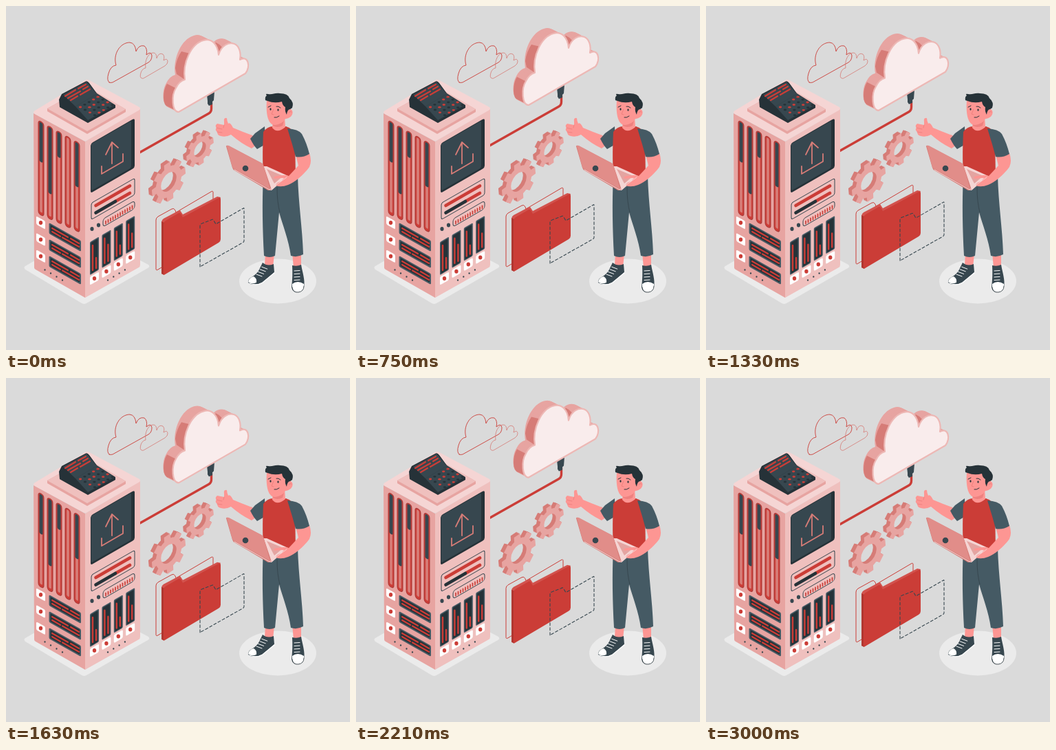
An HTML page for the animation above (3.04 s loop, 500x500 px).

```html
<!DOCTYPE html>
<html lang="en">
<head>
<meta charset="utf-8">
<title>Cloud upload</title>
<style>
html, body { margin: 0; width: 100%; height: 100%; overflow: hidden; background: #dadada; }
svg { display: block; width: 100vw; height: 100vh; }
</style>
</head>
<body>
<svg id="stage" viewBox="0 0 500 500"></svg>
<script>
const C = {
  red: '#cb3d37', night: '#263238', slate: '#37474f', steel: '#455a64', skin: '#fd9693', skinShade: '#ee817f',
  pale: '#f9ecec', light: '#f5d5d4', face: '#efc0be', side: '#e7a4a1', deep: '#d67c77', white: '#fff', floor: '#ebebeb'
};
const LEFT = 0.56, RIGHT = -0.577;

const path = (d, fill, extra = '') => `<path d="${d}" fill="${fill}" ${extra}/>`;
const line = (d, stroke, width = 1, extra = '') =>
  path(d, 'none', `stroke="${stroke}" stroke-width="${width}" stroke-linecap="round" stroke-linejoin="round" ${extra}`);
const oval = (x, y, rx, ry, fill, extra = '') =>
  `<ellipse cx="${x}" cy="${y}" rx="${rx}" ry="${ry}" fill="${fill}" ${extra}/>`;
// Rectangle lying on one of the two vertical faces; (x, y) is its upper left corner.
const panel = (slope, x, y, w, h, fill, r = 1, extra = '') =>
  `<rect width="${w}" height="${h}" rx="${r}" fill="${fill}" transform="matrix(1 ${slope} 0 1 ${x} ${y})" ${extra}/>`;
const repeat = (n, draw) => Array.from({ length: n }, (_, i) => draw(i)).join('');
const group = (content, attrs = '') => `<g ${attrs}>${content}</g>`;

function button(slope, x, y) {
  return panel(slope, x - 6.5, y - 6 - slope * 6.5, 13, 12, C.white, 2) + oval(x, y, 2.7, 3, C.red);
}

function terminal() {
  const keys = repeat(4, row => repeat(5, col => {
    const x = 108 + col * 6.4 + row * 7, y = 147 - col * 3.7 + row * 3.9;
    return oval(x, y, 2.2, 1.4, (row * 2 + col * 3) % 4 < 2 ? C.red : C.night);
  }));
  return path('M60 149L117 117L174 150V154L118 186L60 153Z', C.side) +
    path('M60 149L117 117L174 150L118 182Z', C.face) +
    path('M77 136L81 128L115 110Q118 108 121 112L132 127L159 144V148L119 170L78 147Z', C.night) +
    path('M83 129L117 110L132 128L101 146Z', C.slate) +
    path('M101 146L132 128L158 144L119 166Z', C.slate) + keys +
    line('M86 131L101 122M105 120L116 114M90 134L108 124M112 121L119 117M94 137L104 131M108 129L122 121', C.red, 2.2);
}

function server() {
  const darkness = [0.42, 0.71, 0.27, 0, 0.49];
  const slots = repeat(5, i => {
    const x = 46.5 + i * 13, y = 165 + i * 7.3, h = 137 - i * 1.5;
    return panel(LEFT, x, y, 9, h, '#a93a38', 4.5) +
      panel(LEFT, x + 1, y + 1.6, 7, h - 2, C.red, 3.5) +
      panel(LEFT, x + 2.6, y + 4, 3.8, h - 7, C.deep, 1.9) +
      (darkness[i] ? panel(LEFT, x + 2, y + 3, 5, h * darkness[i], C.slate, 2) : '');
  });
  const racks = repeat(3, i => {
    const y = 315 + i * 24;
    return panel(LEFT, 62.5, y, 46.5, 16, C.steel, 2) + panel(LEFT, 64.5, y + 3, 42.5, 12, C.night) +
      line(`M67 ${y + 8}l23 13M94 ${y + 23}l12 7M67 ${y + 13}l12 7M82 ${y + 21.5}l24 13.5`, C.red, 2.2);
  });
  const bays = repeat(4, i => {
    const x = 122 + i * 17.4, y = 343 - i * 10.2;
    return panel(RIGHT, x, y, 13, 48, C.steel, 1.5) + panel(RIGHT, x + 1.5, y + 1, 10, 45, C.night) +
      line(`M${x + 4} ${y + 5}V${y + 41}M${x + 9} ${y + [23, 14, 25, 18][i]}V${y + 38}`, C.red, 2.4) +
      button(RIGHT, 128.5 + i * 17.4, 396 - i * 10.2);
  });
  const ticks = repeat(12, i => line(`M${145 + i * 3.5} ${312.5 - i * 2.02}v4`, C.red, 1.7, 'stroke-linecap="butt"'));

  return path('M28 378L115 328L207 376Q210 379 206 381L117 432Q114 434 110 432L28 383Q25 380 28 378Z', C.floor) +
    path('M40 156L115 197V424L43 383Q41 382 41 380Z', C.side) +
    path('M115 197L195 150V376Q195 379 193 380L115 424Z', C.face) +
    path('M40 155Q40 153 42 152L115 108Q118 106 121 108L194 147Q196 149 194 151L118 195Q115 197 112 195L42 157Z', C.light) +
    terminal() + slots + racks +
    repeat(3, i => button(LEFT, 50.5, 315 + i * 24.4)) +
    repeat(4, i => oval(56.5 + i * 8.5, 383.5 + i * 5, 1.1, 1.3, C.slate)) +
    panel(RIGHT, 123, 200, 64, 72, C.night, 3) + panel(RIGHT, 124, 200.5, 58, 68, C.slate, 2) +
    line('M154 229V198M145 216L154 198L163 206M139 233V244L170 226V215', C.deep, 1.8) +
    panel(RIGHT, 124, 286.5, 63, 24, 'none', 3, `stroke="${C.slate}"`) +
    line('M130.5 290L180 261.5M159 284L180 272', C.red, 4.6) +
    line('M130.5 300.5L159 284', C.night, 4.6) +
    panel(RIGHT, 141, 309.5, 46, 11.5, 'none', 4, `stroke="${C.slate}"`) + ticks +
    oval(125, 324, 2.6, 3, C.slate) + oval(134.5, 318.5, 2.6, 3, C.slate) + bays +
    repeat(4, i => oval(148 + i * 8.3, 398.5 - i * 5, 1.1, 1.3, C.slate));
}

function cloud() {
  const front = 'M251 154C241 154 240 130 247 119Q252 109 260 107C256 83 269 55 287 50C299 46 308 56 309 71' +
    'C313 57 324 52 332 55C339 58 342 68 340 78C352 71 356 88 348 98Z';
  const depth = repeat(14, i => path(front, C.side, `transform="translate(${i - 14} ${(i - 14) / 2})"`));
  return line('M298.5 140V149Q298.5 154 295 156L180 221', C.red, 3.4) +
    path('M292 129L303 124L302 137L300 139V143L295 145L293 142V138Z', C.slate) +
    depth +
    path('M229 133Q229 121 234 113L248 120Q242 129 243 140Q244 149 250 153L237 147Q229 145 229 133Z', C.deep) +
    path('M246 90Q248 76 255 66L267 69Q259 84 259 101L260 107L248 99Z', C.deep) +
    path('M300 58L305 53Q310 55 314 60Q310 65 309 71Q307 61 300 58Z', C.deep) +
    path(front, C.pale, `stroke="#edb8b5" stroke-width="2.2" stroke-linejoin="round"`);
}

function folder() {
  return line('M226 380L221 383Q218 385 218 382V311Q218 308 221 306L241 295Q244 293 246 297L247 300L298 270Q301 268 301 271V281', C.red) +
    path('M226 314Q226 311 229 309L248 299L253 297L257 303L307 277L312 278L230 391L226 389Z', '#d2524d') +
    path('M226 313L230 315V391L226 389Z', '#b13630') +
    path('M229 317Q229 314 232 312L251 301Q253 300 254 302L257 307L309 279Q312 277 312 281V339Q312 342 309 344L233 389Q229 392 229 388Z', C.red) +
    line('M282 379V320Q282 317 285 316L298 311Q301 309 302 312L305 317L345 294Q346 293 346 295V341Q346 343 344 344Z', C.slate, 1.1,
      'stroke-dasharray="4 3"');
}

function gear(cx, cy, radius, hole) {
  const teeth = 8, step = Math.PI * 2 / teeth, inner = radius * 0.76;
  const at = (r, a) => `${(r * Math.cos(a)).toFixed(2)} ${(r * Math.sin(a)).toFixed(2)}`;
  const rim = repeat(teeth, i => {
    const a = i * step - 0.1;
    return `${i ? 'L' : 'M'}${at(inner, a - 0.25)}L${at(radius, a - 0.18)}L${at(radius, a + 0.18)}L${at(inner, a + 0.25)}` +
      `A${inner} ${inner} 0 0 1 ${at(inner, a + step - 0.25)}`;
  });
  const d = `${rim}ZM${hole} 0A${hole} ${hole} 0 1 0 ${-hole} 0A${hole} ${hole} 0 1 0 ${hole} 0Z`;
  const layer = (dx, fill) => path(d, fill,
    `fill-rule="evenodd" stroke-linejoin="round" transform="matrix(.866 -.5 0 1 ${cx + dx} ${cy + dx / 2})"`);
  return repeat(5, i => layer(i - 5, C.deep)) + layer(0, C.side);
}

function person() {
  const stitches = (x, y, dx, dy) => repeat(4, i => line(`M${x + i * dx} ${y + i * dy}l8 ${dx ? 3 : -0.5}`, C.white, 1));
  const legs =
    path('M377 360L376 376L388 380L390 360ZM416 358L418 381L429 380L429 358Z', C.skin) +
    path('M373 373Q380 379 389 375L390 387C383 393 377 398 372 402Q365 406 354 404Q350 401 354 396Q363 391 367 385Z', C.slate) +
    path('M352 401Q353 395 360 393Q365 396 364 402Q357 405 352 401Z', C.white) +
    line('M353 403Q365 407 373 402L390 388', C.white, 1.2) + stitches(364, 390, 2.6, -3.6) +
    path('M416 377Q423 379 429 376C431 388 435 398 433 409Q430 416 423 416Q416 416 415 408Q417 394 416 377Z', C.slate) +
    path('M416 404Q424 398 433 404Q434 416 424 416Q415 416 416 404Z', C.white) +
    line('M416 409Q417 417 425 416Q433 415 433 407', C.night, 0.8) + stitches(419, 385, 0, 4.5) +
    path('M374 248L424 246C425 288 431 324 432 361Q423 366 414 363C411 340 402 318 397 300L391 363Q383 367 375 363C373 326 372 286 374 248Z', C.steel) +
    line('M394 264Q394 285 398 300', C.slate, 1);
  const body =
    path('M358 188Q344 183 330 177C327 171 325 169 323 171Q321 166 321 163Q316 162 317 168L317 173L307 171Q303 174 306 177' +
      'Q303 180 307 183Q307 188 312 189Q320 191 327 187Q342 200 357 207L368 199Z', C.skin) +
    line('M306 177L314 179M307 183L314 184M317 173L316 177', C.skinShade, 0.9) +
    path('M376 175L362 185L355 193Q360 203 365 208L377 201Z', C.steel) +
    path('M374 183Q380 175 388 175H407Q418 178 420 190L421 250Q398 265 376 258C372 235 373 208 374 183Z', C.red) +
    path('M388 163L387 177Q394 186 406 176L405 160Z', C.skin) +
    path('M388 169Q396 174 404 167L402 174Q394 178 388 174Z', C.skinShade);
  const head =
    path('M379 138C378 148 379 158 381 164Q384 173 391 173Q401 172 406 164C417 163 419 153 414 150Q411 148 408 152L409 138Q390 130 379 138Z', C.skin) +
    path('M380 138L377 137Q376 132 379 130Q376 127 381 128C388 129 390 126 398 127Q410 127 412 134Q419 140 416 148L413 150' +
      'Q409 150 408 158Q405 153 406 147Q402 145 401 139Q390 142 380 138Z', C.night) +
    oval(384.5, 150, 1.1, 1.7, C.night) + oval(395.5, 151, 1.1, 1.7, C.night) +
    line('M381 147L385 145M393 146Q396 145 399 148', C.night, 1) +
    line('M389 150L386 157L389 158', C.skinShade, 1) + line('M390 162Q393 163 397 160', C.night, 1) +
    line('M411 155Q413 152 415 154', C.skinShade, 1);
  const laptop =
    path('M373 233L379 233L410 247L386 268L379 267Z', C.light) +
    path('M379 237L403 247L390 258Z', C.deep, 'opacity=".55"') +
    path('M421 216L441 214Q445 225 441 234C432 246 420 256 410 260Q400 264 392 261Q393 256 400 255L404 250Q396 250 390 251Q388 247 395 247Q405 245 411 247L425 232Z', C.skin) +
    path('M409 178Q425 179 430 186Q437 199 441 215Q431 221 421 219L416 201Z', C.steel) +
    path('M320 204Q320 202 323 203L371 228Q373 229 374 231L386 267L381 268L332 239Q330 238 329 235Z', C.deep) +
    path('M321 204Q321 202 324 203L371 228Q373 229 374 231L384 266L332 237Q330 236 329 234Z', '#e18d89') +
    line('M332 238L383 267L408 249', C.light, 1) +
    oval(348, 236, 4.3, 4.3, C.slate);
  return oval(395, 400, 56, 32.5, C.floor) + legs + body + head + laptop;
}

const outlines =
  line('M150 111Q146 108 149 98Q152 87 160 86C155 70 166 53 180 53Q188 54 189 66Q193 56 201 58Q206 62 204 71Q211 65 212 72Q212 79 207 82L155 111Q152 112 150 111Z', C.red, 0.9) +
  line('M197 105Q194 104 196 97Q198 91 203 90C201 79 207 68 214 68Q219 68 219 76Q222 67 228 70Q231 73 229 79Q235 75 235 81Q235 84 231 87L200 105Z', C.deep, 0.8);

const stage = document.getElementById('stage');
stage.innerHTML = '<rect width="500" height="500" fill="#dadada"/>' + outlines +
  group(cloud(), 'id="cloud"') + server() + gear(236.5, 255.5, 28.5, 13) + gear(282, 208.5, 23, 10) +
  group(folder(), 'id="folder"') + person();

const cloudGroup = document.getElementById('cloud');
const folderGroup = document.getElementById('folder');
const LOOP = 3040, FPS = 24, LIFT = 10;

// Straight up and down: 0 at the ends of each period, -LIFT halfway.
function float(seconds, period) {
  const phase = (seconds % period) / period;
  return -LIFT * (1 - Math.abs(2 * phase - 1));
}

function render(ms) {
  // Held at 24 pictures per second, with change times on 10 ms ticks.
  const tick = Math.floor((ms % LOOP) / 10) * 10 + 9.99;
  const seconds = Math.floor(tick * FPS / 1000) / FPS;
  cloudGroup.setAttribute('transform', `translate(0 ${float(seconds, 1.5)})`);
  folderGroup.setAttribute('transform', `translate(0 ${float(seconds, 3)})`);
}

const start = performance.now();
function loop() {
  render(performance.now() - start);
  requestAnimationFrame(loop);
}
loop();
</script>
</body>
</html>
```
